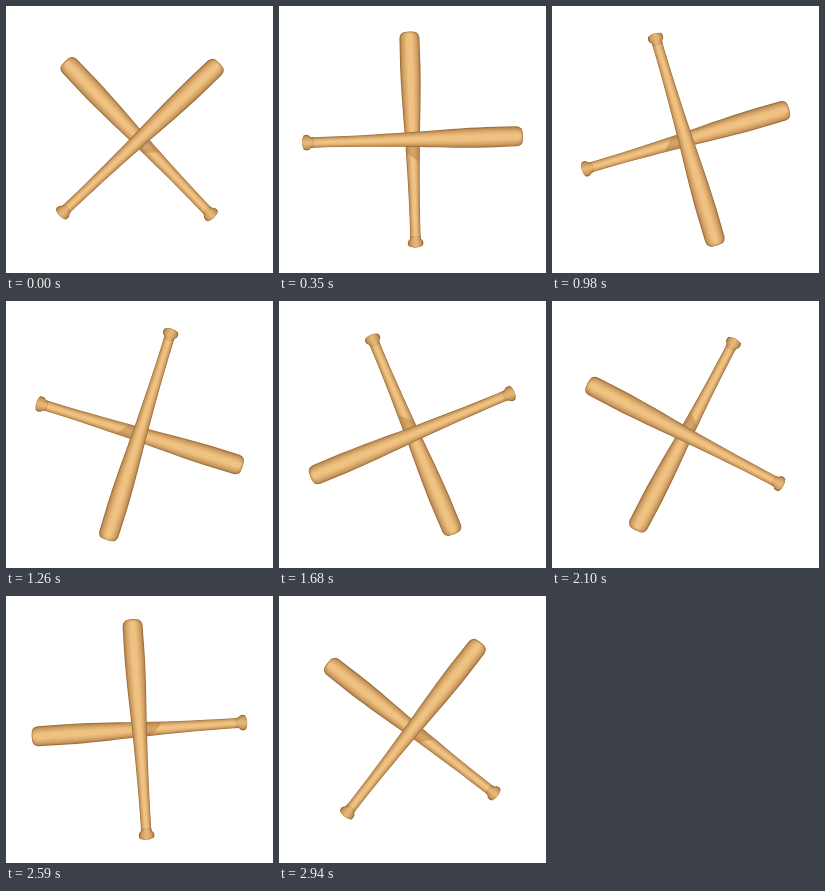
Animation, 267 px wide and 267 px high, one loop 3010 ms. Source, as an HTML page:

```html
<!DOCTYPE html>
<html lang="en">
<head>
<meta charset="utf-8">
<title>Crossed bats</title>
<style>
  html, body { margin: 0; width: 100%; height: 100%; overflow: hidden; background: #fff; }
  svg { display: block; width: 100vw; height: 100vh; }
</style>
</head>
<body>
<svg viewBox="0 0 267 267">
  <defs>
    <path id="wood" d="M-106 -5.2 C-70 -5 -40 -5.9 0 -7.4 C30 -8.8 50 -10 75 -10.2 L104 -10 Q109.5 -9.4 110.2 -5 Q111 0 110.2 5 Q109.5 9.4 104 10 L75 10.2 C50 10 30 8.8 0 7.4 C-40 5.9 -70 5 -106 5.2 Z"/>
    <path id="knob" d="M-99 -4.8 Q-102.5 -5.2 -103.5 -7.2 Q-106.5 -8.6 -109 -7 Q-112 0 -109 7 Q-106.5 8.6 -103.5 7.2 Q-102.5 5.2 -99 4.8 Z"/>
  </defs>
  <g id="pair"></g>
</svg>
<script>
const STEP_MS = 70, STEPS = 43, CENTER = 133.5;
const EDGE = [158, 108, 56], LIGHT = [240, 194, 130];
const pair = document.getElementById('pair');

const mix = k => `rgb(${EDGE.map((c, i) => Math.round(c + (LIGHT[i] - c) * k))})`;

// Nested, ever narrower outlines give the wood its round shading.
function shaded(id, cx, layers, brightness) {
  let out = '';
  for (let i = 0; i < layers; i++) {
    const k = i / (layers - 1);
    const sx = 1 - 0.02 * k, sy = 1 - 0.75 * k;
    out += `<use href="#${id}" fill="${mix(brightness * Math.sqrt(k))}"
      transform="translate(${cx * (1 - sx)} 0) scale(${sx} ${sy})"/>`;
  }
  return out;
}

function bat(angle, length, shadow = '') {
  return `<g transform="rotate(${angle}) scale(${length} 1)">
    ${shaded('wood', 0, 9, 1)}${shadow}${shaded('knob', -105, 6, 0.85)}</g>`;
}

const shadow = '<path d="M-4 -6.4 L-13 -6.2 L-23 5.2 L-4 6.4 Z" fill="#a8763e" opacity=".4"/>';
pair.innerHTML = bat(-133.6, 0.977, shadow) + bat(-43.6, 1);

function draw(ms) {
  const step = Math.floor(ms / STEP_MS) % STEPS;
  pair.setAttribute('transform', `translate(${CENTER} ${CENTER}) rotate(${step * 360 / STEPS})`);
}

const start = performance.now();
function tick() {
  draw(performance.now() - start);
  requestAnimationFrame(tick);
}
tick();
</script>
</body>
</html>
```
